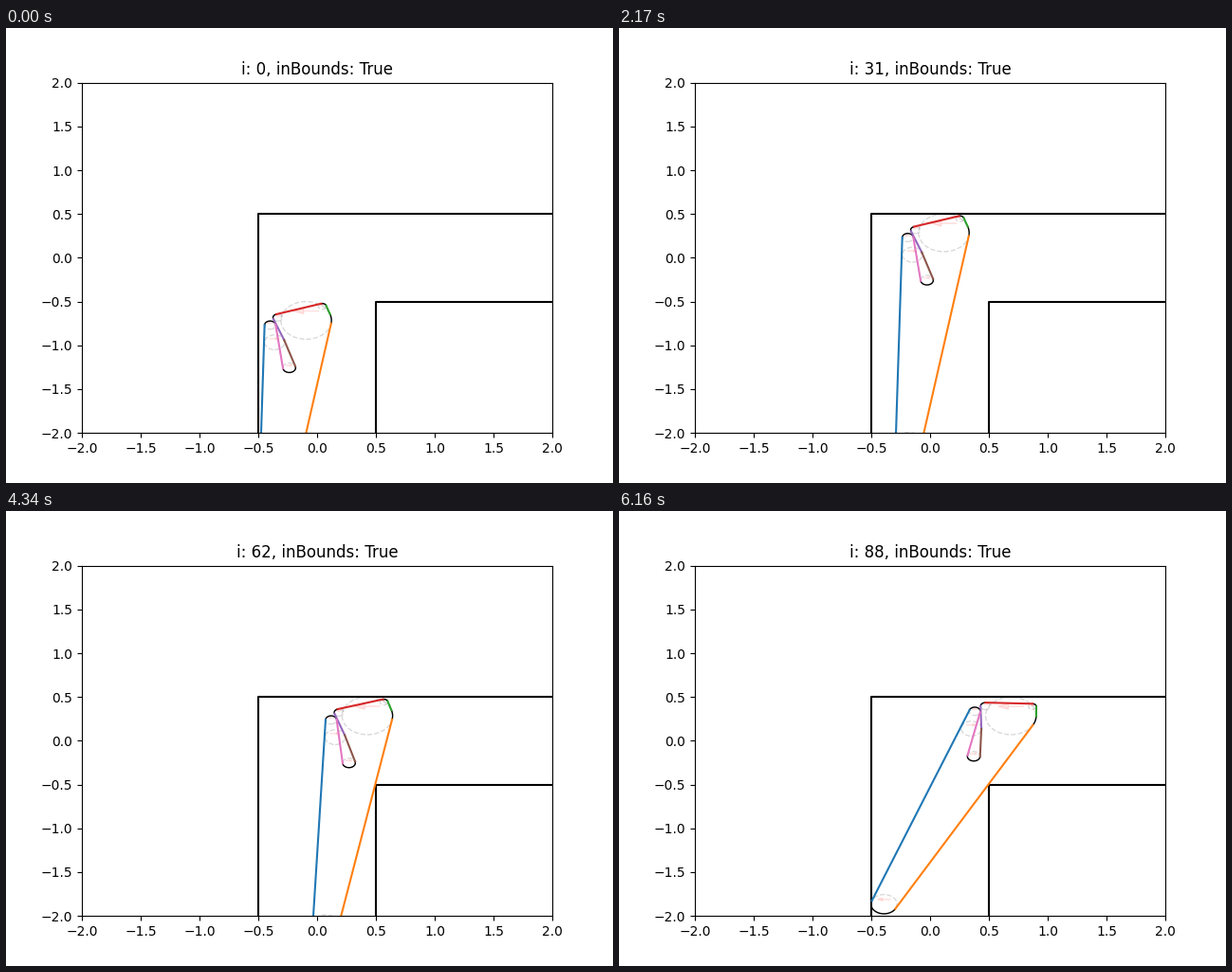
These frames come from a looping animation (640 by 480 pixels, 6230 ms). A matplotlib script:

```python
import numpy as np
import matplotlib.pyplot as plt
from matplotlib.animation import FuncAnimation

FRAMES = 89
LIFT = 10                      # steps spent moving straight up
BASE_TILT, TILT_STEP = 9.65, 0.65
HUB_R = 0.215
TAIL = np.radians(7.15)

# x, y relative to the hub, radius, winding (+1 counterclockwise)
SPOOLS = [
    (-0.3065, -0.054, 0.047, 1),
    (-2.406 * np.sin(TAIL), -2.406 * np.cos(TAIL), 0.11, 1),
    (0.0, 0.0, HUB_R, 1),
    (0.138, 0.160, 0.033, 1),
    (-0.242, 0.032, 0.040, 1),
    (-0.268, -0.250, 0.085, -1),
    (-0.1435, -0.541, 0.054, -1),
]

fig, ax = plt.subplots(figsize=(6.4, 4.8), dpi=100)
ax.set_xlim(-2, 2)
ax.set_ylim(-2, 2)
ax.plot([-0.5, -0.5, 3], [-3, 0.5, 0.5], color="black")
ax.plot([0.5, 0.5, 3], [-3, -0.5, -0.5], color="black")
title = ax.set_title("")
drawn = []


def hub_at(i):
    x = -0.093 + 0.01 * max(0, i - LIFT)
    y = -0.715 + 0.1 * min(i, LIFT)
    return x, y


def turn_at(x, y):
    """Clockwise turn that keeps the long right side off the inner corner."""
    dx, dy = x - 0.5, y + 0.5
    need = np.arctan2(dx, dy) + np.arcsin(HUB_R / np.hypot(dx, dy))
    steps = np.ceil((np.degrees(need) - BASE_TILT) / TILT_STEP)
    return np.radians(TILT_STEP * max(0, steps))


def placed(i):
    hx, hy = hub_at(i)
    a = turn_at(hx, hy)
    c, s = np.cos(a), np.sin(a)
    return [(hx + x * c + y * s, hy - x * s + y * c, r, w)
            for x, y, r, w in SPOOLS]


def heading(p, q):
    dx, dy = q[0] - p[0], q[1] - p[1]
    gap = (p[3] * p[2] - q[3] * q[2]) / np.hypot(dx, dy)
    return np.arctan2(dy, dx) + np.arcsin(gap)


def rim(spool, h):
    x, y, r, w = spool
    return x + w * r * np.sin(h), y - w * r * np.cos(h)


def draw(i):
    while drawn:
        drawn.pop().remove()
    spools = placed(i)
    n = len(spools)
    heads = [heading(spools[k], spools[(k + 1) % n]) for k in range(n)]

    for k, spool in enumerate(spools):
        x, y, r, w = spool
        ring = plt.Circle((x, y), r, fill=False, ls="--", lw=1,
                          color="black", alpha=0.15)
        drawn.append(ax.add_patch(ring))
        drawn.append(ax.arrow(x + w * r / 2, y + r / 2, -w * r, 0,
                              width=0.001, head_width=0.3 * r,
                              head_length=0.4 * r,
                              length_includes_head=True,
                              color="red", alpha=0.1))
        h0, h1 = heads[k - 1], heads[k]
        sweep = w * ((w * (h1 - h0)) % (2 * np.pi))
        arc = rim(spool, np.linspace(h0, h0 + sweep, 40))
        drawn.extend(ax.plot(*arc, color="black", lw=1))

    for k, h in enumerate(heads):
        a, b = rim(spools[k], h), rim(spools[(k + 1) % n], h)
        drawn.extend(ax.plot([a[0], b[0]], [a[1], b[1]], color=f"C{k}"))

    title.set_text(f"i: {i}, inBounds: True")
    return drawn + [title]


anim = FuncAnimation(fig, draw, frames=FRAMES, interval=70,
                     repeat=True, repeat_delay=0, blit=False)
plt.show()
```
